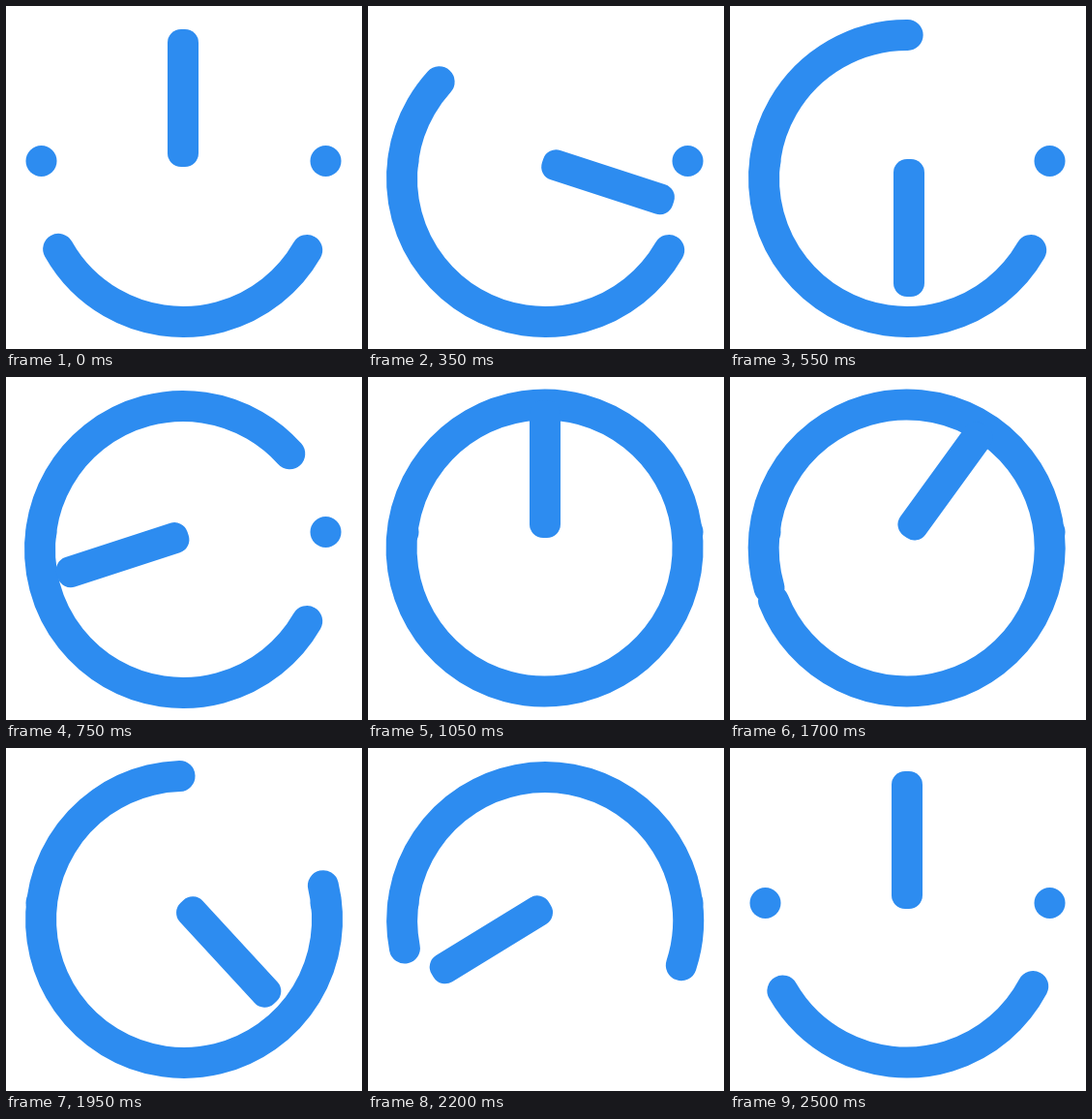
Animation of 368 by 354 pixels, one loop 2850 ms. Source, as an HTML page with a canvas:

```html
<!DOCTYPE html>
<html lang="en">
<head>
<meta charset="utf-8">
<title>Smile loader</title>
<style>
  html, body { margin: 0; height: 100%; overflow: hidden; background: #fff; }
  canvas { display: block; }
</style>
</head>
<body>
<canvas id="stage" width="368" height="354"></canvas>
<script>
const ctx = document.getElementById('stage').getContext('2d');
const LOOP = 2850, STEP = 50, RADIUS = 148;
const rad = deg => deg * Math.PI / 180;
const progress = (t, from, to) => Math.min(1, Math.max(0, (t - from) / (to - from)));

function dot(x, y) {
  ctx.beginPath();
  ctx.arc(x, y, 16, 0, 2 * Math.PI);
  ctx.fill();
}

// Angles are clockwise degrees from the top.
function arc(x, y, start, end) {
  ctx.beginPath();
  ctx.arc(x, y, RADIUS, rad(start - 90), rad(Math.min(end, start + 360) - 90));
  ctx.stroke();
}

function hand(angle) {
  ctx.save();
  ctx.translate(184, 162);
  ctx.rotate(rad(angle));
  ctx.beginPath();
  ctx.roundRect(-17, -138, 32, 142, 14);
  ctx.fill();
  ctx.restore();
}

function draw(t) {
  ctx.fillStyle = '#fff';
  ctx.fillRect(0, 0, 368, 354);
  ctx.fillStyle = ctx.strokeStyle = '#2d8cf0';
  ctx.lineWidth = 32;
  ctx.lineCap = 'round';

  dot(36.5, 160);
  dot(330.5, 160);

  const closing = progress(t, 50, 1050);
  const opening = progress(t, 1681, 2500);
  if (closing < 1) {
    arc(183, 178, 120, 240.5 + 239.5 * closing);
  } else {
    // The ring turns once about a point just off its centre while it shortens.
    const turn = 360 * opening;
    const wobble = rad(turn - 45);
    arc(183.2 + 0.9 * Math.sin(wobble), 177.2 - 0.9 * Math.cos(wobble),
        -120 + 598 * opening, 240 + turn);
  }

  hand(360 * (closing + progress(t, 1611, 2500)));
}

function tick(now) {
  const t = now % LOOP;
  draw(Math.floor(t / STEP) * STEP);
  requestAnimationFrame(tick);
}
draw(0);
requestAnimationFrame(tick);
</script>
</body>
</html>
```
